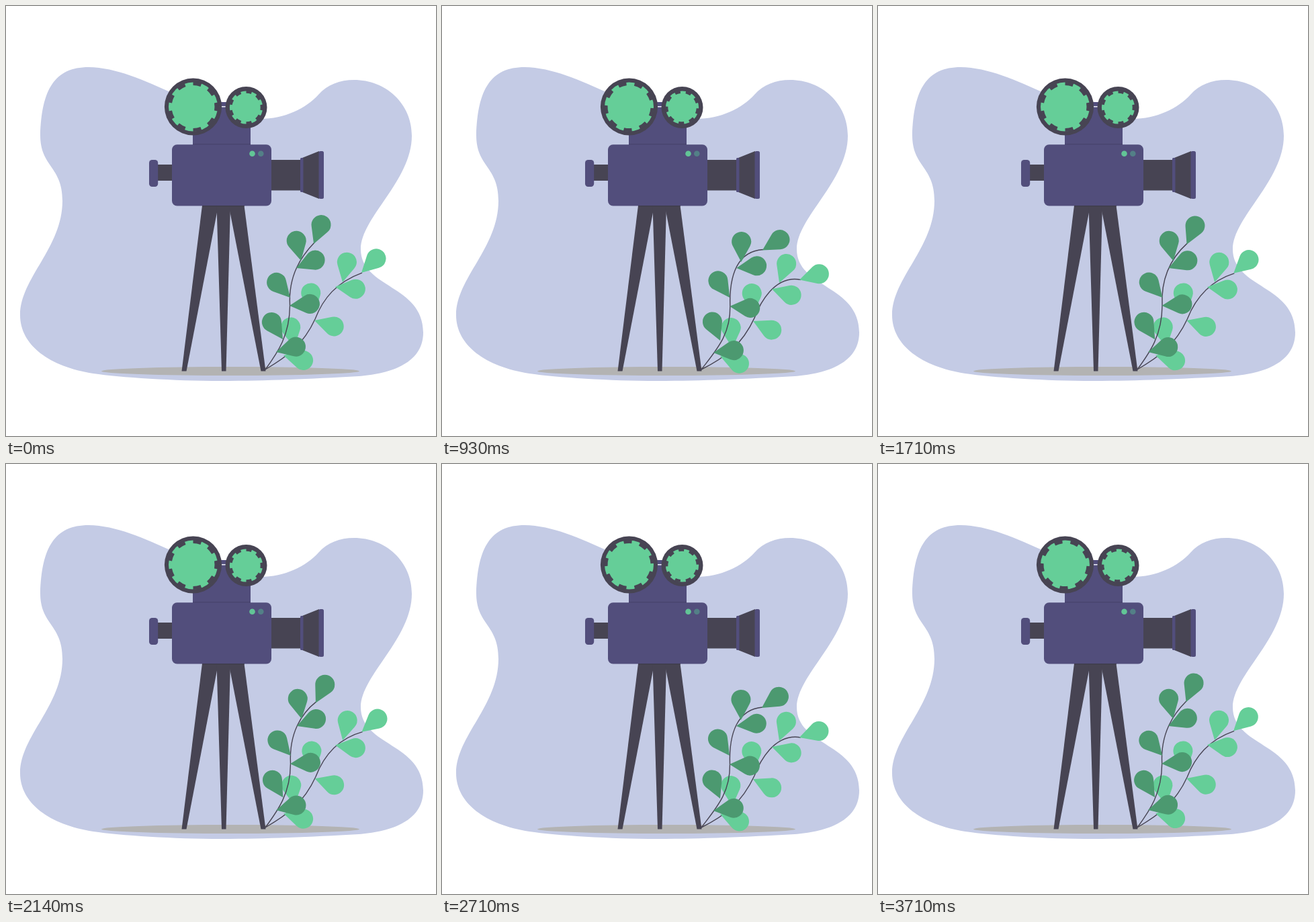
An HTML page with a canvas for the animation above (3.78 s loop, 640 px wide and 640 px high).

```html
<!DOCTYPE html>
<html lang="en">
<head>
<meta charset="utf-8">
<title>Film camera and plant</title>
<style>
html, body { margin: 0; width: 100%; height: 100%; overflow: hidden; background: #fff; }
canvas { display: block; width: 640px; height: 640px; }
</style>
</head>
<body>
<canvas id="stage" width="640" height="640"></canvas>
<script>
const ctx = document.getElementById('stage').getContext('2d');
const LOOP = 3780, FPS = 14, SWAY_FRAMES = 27;
const TAU = Math.PI * 2, RAD = Math.PI / 180;
const DARK = '#474453', PURPLE = '#524e7c', GREEN = '#65ce98', LEAF = '#4c9970';

const blob = new Path2D(`M51 192C53 125 72 91 123 91C205 92 290 168 378 168
  C415 168 447 152 465 132C478 117 497 110 518 110C565 110 604 145 604 193
  C604 260 528 315 528 362C528 420 621 415 621 486C621 535 565 548 525 551
  C450 555 390 558 320 558C250 558 170 553 130 547C65 537 21 505 21 460
  C21 405 84 360 84 290C84 238 51 240 51 192Z`);

// Stems: control points at rest and bent. Leaves: tip x, y, tip shift x, y, angle at rest and bent.
const plants = [
  {
    color: GREEN,
    rest: [418, 522, 442, 505, 460, 466, 472, 435, 492, 411, 530, 397],
    bent: [420, 524, 446, 505, 465, 464, 472, 445, 494, 400, 534, 407],
    leaves: [
      [529, 397, 3, 10, -44, -18],
      [501, 411, 1, 1, -78, -70],
      [490, 418, 1, 3, 6, 17],
      [459, 457, 4, 1, -100, -94],
      [459, 468, 4, 1, 17, 25],
      [429, 508, 3, 1, -100, -94],
      [413, 520, 1, 1, 14, 21]
    ]
  },
  {
    color: LEAF,
    rest: [405, 515, 422, 490, 422.5, 446, 420, 400, 440, 372, 459, 352],
    bent: [408, 512, 429, 490, 428.5, 447, 427, 400, 440, 365, 477, 362],
    leaves: [
      [458, 354, 18, 9, -69, -33],
      [439, 379, 6, 2, -103, -90],
      [432, 390, 6, 0, -23, -7],
      [423, 434, 5, 0, -132, -125],
      [422, 446, 6, 1, -5, 4],
      [412, 496, 2, 2, -123, -113],
      [402, 515, 2, 1, -15, -7]
    ]
  }
];

const mix = (a, b, u) => a + (b - a) * u;

function circle(x, y, r, color) {
  ctx.fillStyle = color;
  ctx.beginPath();
  ctx.arc(x, y, r, 0, TAU);
  ctx.fill();
}

function box(x, y, w, h, r, color) {
  ctx.fillStyle = color;
  ctx.beginPath();
  ctx.roundRect(x, y, w, h, r);
  ctx.fill();
}

function polygon(color, ...points) {
  ctx.fillStyle = color;
  ctx.beginPath();
  points.forEach(([x, y]) => ctx.lineTo(x, y));
  ctx.closePath();
  ctx.fill();
}

function drawReel(x, y, rim, outer, inner, turn) {
  const notches = 9, step = TAU / notches;
  circle(x, y, rim, DARK);
  circle(x, y, outer, GREEN);
  ctx.strokeStyle = DARK;
  ctx.lineWidth = outer - inner + 0.6;
  for (let i = 0; i < notches; i++) {
    const start = turn + i * step;
    ctx.beginPath();
    ctx.arc(x, y, (outer + inner) / 2 + 0.3, start, start + step / 2);
    ctx.stroke();
  }
}

function drawScene() {
  ctx.fillStyle = '#fff';
  ctx.fillRect(0, 0, 640, 640);
  ctx.fillStyle = '#c4cbe5';
  ctx.fill(blob);
  ctx.fillStyle = '#b3b3b3';
  ctx.beginPath();
  ctx.ellipse(334, 543.5, 192, 6.5, 0, 0, TAU);
  ctx.fill();
}

function drawCamera(turn) {
  polygon(DARK, [292, 297], [316, 297], [268.5, 543.5], [261.5, 543.5]);
  polygon(DARK, [313.5, 297], [334, 297], [327.5, 543.5], [321, 543.5]);
  polygon(DARK, [331.5, 297], [354.5, 297], [386.5, 543.5], [379.5, 543.5]);

  box(278, 143, 86, 64, 0, PURPLE);
  box(319, 149, 10, 1.6, 0, '#e8eaf5');
  drawReel(278.5, 150, 42.6, 36.5, 32, turn);
  drawReel(357.5, 151, 31, 24.6, 21.2, turn);

  box(226, 236, 22, 24, 0, DARK);
  box(213, 229, 13.2, 40, 4.5, PURPLE);
  box(394, 229, 45, 45.5, 0, DARK);
  polygon(DARK, [441, 226], [466, 216], [466, 287], [441, 277]);
  box(438, 226, 4.5, 51, 1.5, PURPLE);
  box(465.5, 216, 7.5, 71, 2.5, PURPLE);

  box(247, 206.3, 148, 91.2, 7.5, PURPLE);
  box(278, 205.3, 86, 1, 0, '#454169');
  box(292, 297.2, 63, 1, 0, '#3b3846');
  circle(366.5, 219.8, 4.3, '#62c596');
  circle(379.3, 219.8, 4.3, '#538087');
}

function drawLeaf([x, y, dx, dy, from, to], u) {
  const length = 30.5, radius = 14.5;
  const tangent = Math.acos(radius / length);
  ctx.save();
  ctx.translate(x + dx * u, y + dy * u);
  ctx.rotate(mix(from, to, u) * RAD);
  ctx.beginPath();
  ctx.moveTo(0, 0);
  ctx.arc(length, 0, radius, -Math.PI + tangent, Math.PI - tangent);
  ctx.closePath();
  ctx.fill();
  ctx.restore();
}

function drawPlant({ color, rest, bent, leaves }, u) {
  const p = rest.map((v, i) => mix(v, bent[i], u));
  ctx.strokeStyle = DARK;
  ctx.lineWidth = 1.4;
  ctx.beginPath();
  ctx.moveTo(386, 541);
  ctx.bezierCurveTo(...p.slice(0, 6));
  ctx.bezierCurveTo(...p.slice(6));
  ctx.stroke();
  ctx.fillStyle = color;
  leaves.forEach(leaf => drawLeaf(leaf, u));
}

function render(now) {
  const step = Math.floor((now % LOOP + 6) * FPS / 1000);
  const phase = (step + 0.5) / SWAY_FRAMES * TAU;
  const sway = 1.05 * (1 - Math.cos(phase)) / 2;
  drawScene();
  drawCamera(-Math.PI / 2 + step / SWAY_FRAMES * TAU);
  plants.forEach(plant => drawPlant(plant, sway));
}

const origin = performance.now();
function tick() {
  render(performance.now() - origin);
  requestAnimationFrame(tick);
}
tick();
</script>
</body>
</html>
```
